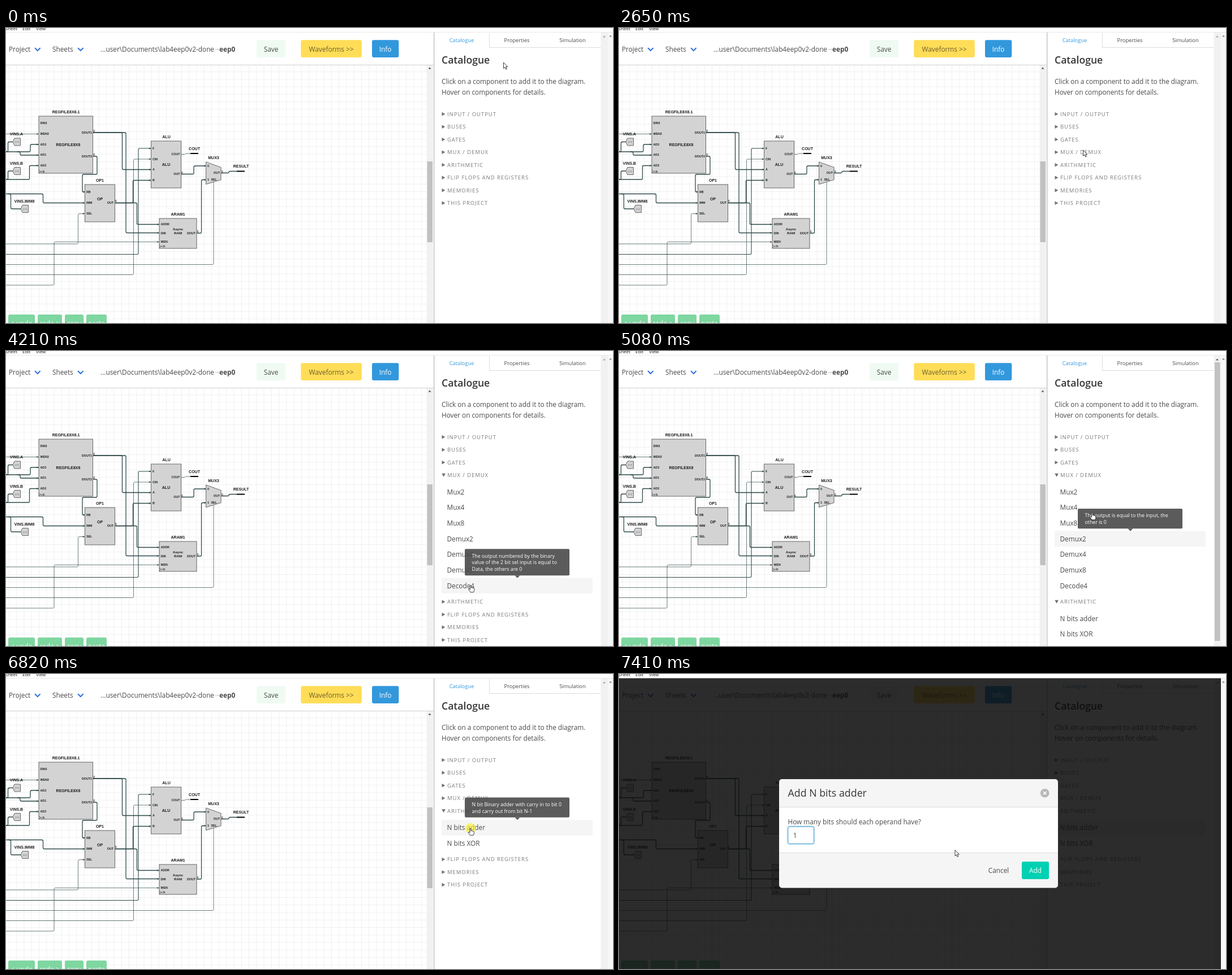
Animation, 1073 px wide and 522 px high, one loop 8 s. Source, as an HTML page:

```html
<!DOCTYPE html>
<html lang="en">
<head>
<meta charset="utf-8">
<title>Component catalogue</title>
<style>
html, body { margin: 0; width: 100%; height: 100%; overflow: hidden; background: #fff; }
svg { display: block; width: 1073px; height: 522px; }
text { font-family: "Open Sans", "Noto Sans", sans-serif; font-size: 11.8px; fill: #4a4a4a; white-space: pre; }
.c { text-anchor: middle; }
.e { text-anchor: end; }
.w { fill: #fff; }
.top { font-size: 8px; fill: #222; }
.tab { font-size: 9.3px; text-anchor: middle; }
.h1 { font-size: 17.6px; font-weight: 600; fill: #363636; }
.title { font-size: 17.8px; fill: #363636; }
.label { font-size: 9.5px; letter-spacing: .95px; fill: #7a7a7a; }
.tip { font-size: 8.8px; fill: #fff; }
.name, .port, .ram, .clk { font-family: "Liberation Sans", Arial, sans-serif; font-weight: bold; fill: #1c1c1c; }
.name { font-size: 7px; text-anchor: middle; }
.port { font-size: 5.3px; }
.ram { font-size: 6.2px; text-anchor: middle; }
.clk { font-size: 5.5px; font-weight: normal; }
.part { fill: #d3d3d3; stroke: #5a5a5a; stroke-width: .9; }
.wire { fill: none; stroke: #2f4a4a; }
.arrow { fill: #2f4a4a; }
.cur { fill: #fff; stroke: #222; stroke-width: .9; stroke-linejoin: round; }
</style>
</head>
<body>
<svg viewBox="0 0 1073 522">
  <defs>
    <pattern id="grid" width="13.25" height="13.25" patternUnits="userSpaceOnUse" x="5" y="77">
      <path d="M0 .5H13.25M.5 0V13.25" stroke="#f0f0f0" fill="none"/>
    </pattern>
  </defs>
  <g id="app"></g>
  <g id="menu"></g>
  <g id="modal"></g>
  <circle id="glow" r="9.3" fill="#fbf032"/>
  <g id="cursor">
    <path id="arrow" class="cur" d="M0 0V10.4L2.4 8.3L4.1 12L5.9 11.2L4.2 7.6H7.3Z"/>
    <path id="hand" class="cur" d="M-1 5.5V.3Q0-1 1 .3V4Q2 3.2 3 4.3Q4 3.6 4.8 4.8Q6.4 4.5 6.3 6V8.6Q6 10.4 5 11.8H-.6Q-1.6 9.8-3.7 7.6Q-4.2 6.2-2.8 6Q-1.6 6.4-1 7.4Z"/>
  </g>
</svg>
<script>
const $ = id => document.getElementById(id);
const esc = s => s.replace(/&/g, '&amp;').replace(/</g, '&lt;').replace(/>/g, '&gt;');
const SIZE = { top: 8, tab: 9.3, h1: 17.6, title: 17.8, label: 9.5, tip: 8.8, name: 7, port: 5.3, ram: 6.2, clk: 5.5 };

// Text placed by the middle of its capitals.
const text = (x, mid, s, cls = '', attr = '') => {
  const size = SIZE[cls.split(' ')[0]] || 11.8;
  return `<text x="${x}" y="${(mid + size * .36).toFixed(2)}" class="${cls}" ${attr}>${esc(s)}</text>`;
};
const box = (x, y, x2, y2, fill, r = 0, attr = '') =>
  `<rect x="${x}" y="${y}" width="${x2 - x}" height="${y2 - y}" rx="${r}" fill="${fill}" ${attr}/>`;
const path = (d, attr) => `<path d="${d}" ${attr}/>`;
const button = (x, y, x2, y2, fill, label, cls = 'c w', attr = '') =>
  box(x, y, x2, y2, fill, 3) + text((x + x2) / 2, (y + y2) / 2 + .7, label, cls, attr);
const upArrow = (x, y, fill) => path(`M${x - 2.5} ${y + 1.5}L${x} ${y - 1.5}L${x + 2.5} ${y + 1.5}Z`, `fill="${fill}"`);

// Right-angled wire: start point, then alternating x and y of each turn.
function wire(width, x, y, ...turns) {
  const pts = [[x, y]];
  turns.forEach((v, i) => {
    const [px, py] = pts[i];
    pts.push(i % 2 ? [px, v] : [v, py]);
  });
  let d = `M${x} ${y}`;
  for (let i = 1; i < pts.length - 1; i++) {
    const p = pts[i];
    const near = q => {
      const len = Math.hypot(q[0] - p[0], q[1] - p[1]), k = Math.min(2.2, len / 2) / len;
      return `${p[0] + (q[0] - p[0]) * k} ${p[1] + (q[1] - p[1]) * k}`;
    };
    d += `L${near(pts[i - 1])}Q${p} ${near(pts[i + 1])}`;
  }
  return path(d + `L${pts[pts.length - 1]}`, `class="wire" stroke-width="${width}"`);
}
// A wire that ends in an input arrow.
const feed = (width, ...p) =>
  wire(width, ...p) + path(`M${p.at(-1)} ${p.at(-2)}l-3.6-1.6v3.2Z`, 'class="arrow"');
const part = (x, y, x2, y2) => box(x, y, x2, y2, '#d3d3d3', 0, 'class="part"');
const ports = (x, list, cls = 'port') => list.map(([y, s]) => text(x, y, s, cls)).join('');
const clock = (x, y) => path(`M${x} ${y - 2.5}l3.5 2.5l-3.5 2.5`, 'fill="none" stroke="#333" stroke-width=".7"') + text(x + 4, y, 'clk', 'clk');
const viewer = (x, y) => path(`M${x} ${y}l3-6.5h10.5v13h-10.5Z`, 'class="part"') +
  text(x + 3.5, y, '(8:0)', 'clk', 'style="font-size:3.8px;fill:#777"');

function circuit() {
  const thick = 1.3, thin = .7;
  return feed(thick, 153.5, 185, 205.5, 250.5, 257) + feed(thick, 153.5, 185, 212, 362.5, 271) +
    feed(thick, 153.5, 227, 161, 259, 135, 290, 139.5) +
    feed(thick, 0, 293.5, 65.5, 309.5, 139.5) + wire(thick, 4, 293.5, 8.5, 320, 26) +
    feed(thin, 0, 382, 127.5, 328.5, 139.5) +
    feed(thick, 192.5, 309.5, 224.5, 269.5, 256.5) + feed(thick, 192.5, 309.5, 231.5, 347.5, 271) +
    feed(thin, 0, 436.5, 225.5, 232, 256.5) + feed(1.1, 0, 400.5, 234, 213, 256.5) +
    feed(thin, 0, 455, 85, 378.5, 271) + wire(thin, 0, 418.5, 367, 272) +
    feed(thick, 309.5, 258.5, 332, 244, 354) + feed(thick, 337, 363, 345.5, 268.5, 354) +
    wire(thin, 309.5, 223.5, 317, 222, 326) + wire(thick, 380, 256.5, 394, 253.5, 408) +
    feed(thin, 0, 187.5, 58) + feed(thick, 0, 219, 43, 206, 58) + feed(thick, 20, 219, 25, 225, 58) +
    wire(thick, 0, 219, 3.5, 201.5, 12) + feed(thick, 0, 268, 41.5, 243.5, 58) + wire(thick, 0, 268, 3.5, 253, 12) +
    path('M326 222h14M408 253.5h14', 'stroke="#000" stroke-width="2.2"') +
    part(58, 156, 153.5, 257) + part(139.5, 277, 192.5, 343) +
    part(256.5, 200, 309.5, 283) + part(271, 337, 337, 390) +
    path('M353.5 237L380 246.5V268.5L353.5 276.5Z', 'class="part"') +
    viewer(12, 201.5) + viewer(12, 253) + viewer(26, 320) +
    ports(60.5, [[168, 'DIN3'], [187.5, 'WEN3'], [206, 'AD3'], [224.5, 'AD1'], [243.5, 'AD2']]) +
    ports(152, [[185, 'DOUT1'], [227, 'DOUT2']], 'port e') +
    ports(142, [[290, 'RB'], [309.5, 'IMM'], [328.5, 'SEL']]) +
    ports(259, [[213, 'F'], [232, 'CIN'], [250.5, 'A'], [269.5, 'B']]) +
    ports(307.5, [[223.5, 'COUT'], [258.5, 'OUT']], 'port e') +
    ports(273.5, [[347.5, 'ADDR'], [363, 'DIN'], [378.5, 'WEN']]) +
    ports(356, [[244, '0'], [268.5, '1']]) + text(362.5, 268.5, 'SEL', 'port') +
    text(190, 309.5, 'OUT', 'port e') + text(335, 363, 'DOUT', 'port e') + text(378, 256.5, 'OUT', 'port e') +
    [[154.3, 182], [154.3, 224.5], [309.8, 256], [192.8, 306.5], [337.5, 360], [380.8, 254]]
      .map(([x, y]) => text(x, y, '8', 'clk')).join('') +
    clock(58, 254) + clock(271, 386.5) +
    [[106, 148.5, 'REGFILE8X8.1'], [110, 206.5, 'REGFILE8X8'], [18.5, 187, 'VINS.A'], [18.5, 239, 'VINS.B'],
      [32.5, 306, 'VINS.IMM8'], [166, 269, 'OP1'], [166, 302.5, 'OP'], [283.5, 192, 'ALU'], [283, 241.5, 'ALU'],
      [333, 213, 'COUT'], [367, 229.5, 'MUX3'], [415.5, 244.5, 'RESULT'], [304, 329.5, 'ARAM1']]
      .map(a => text(...a, 'name')).join('') +
    text(304, 355.5, 'Async', 'ram') + text(304, 363, 'RAM', 'ram');
}

function app() {
  const chevron = x => path(`M${x} 35.2l4.8 4.8l4.8-4.8`, 'fill="none" stroke="#3273dc" stroke-width="2"');
  const green = (x, x2, s) => button(x, 507, x2, 537, '#7ed6a0', s);
  return text(-1, .8, 'Sheet', 'top') + text(29, .8, 'Edit', 'top') + text(53, .8, 'View', 'top') +
    box(0, 7, 1073, 8, '#e8e8e8') +
    text(5, 37.5, 'Project') + chevron(51) + text(82, 37.5, 'Sheets') + chevron(127) +
    text(167, 37.5, '...user\\Documents\\lab4eep0v2-done') +
    path('M369 38h7M374 36.3l2 1.7l-2 1.7', 'fill="none" stroke="#bbb" stroke-width=".8"') +
    text(377, 37.5, 'eep0', '', 'font-weight="700"') +
    button(443, 21.3, 494, 52, '#effaf3', 'Save', 'c') +
    button(521.3, 21.3, 628.8, 52, '#ffdd57', 'Waveforms >>', 'c', 'style="fill:#6b5d2b"') +
    button(647, 21.3, 694.3, 52, '#3298dc', 'Info') +
    box(0, 65, 756, 66, '#d0d0d0') +
    box(0, 66, 743.5, 522, 'url(#grid)') + circuit() +
    green(4, 51, '< undo') + green(56, 99, 'redo >') + green(104, 137, 'copy') + green(142, 178, 'paste') +
    box(743.5, 66, 755, 522, '#f1f1f1') + upArrow(749, 71, '#505050') + box(744.5, 236, 754, 379, '#c1c1c1') +
    box(756, 8, 757.3, 522, '#bdbdbd') +
    path('M854.5 9V34.5H1051.5', 'fill="none" stroke="#dbdbdb"') +
    text(805.5, 22, 'Catalogue', 'tab', 'style="fill:#3298dc"') + text(903, 22, 'Properties', 'tab') + text(1001.5, 22, 'Simulation', 'tab') +
    text(770, 57, 'Catalogue', 'h1') +
    text(770, 95, 'Click on a component to add it to the diagram.') + text(770, 113.7, 'Hover on components for details.') +
    box(1051.5, 8, 1064, 522, '#f1f1f1') + box(1064, 8, 1073, 522, '#f7f7f7') + upArrow(1068.5, 14, '#8a8a8a');
}

const GROUPS = [
  ['INPUT / OUTPUT', 'Input', 'Output', 'Viewer', 'Constant', 'Wire Label'], ['BUSES'], ['GATES'],
  ['MUX / DEMUX', 'Mux2', 'Mux4', 'Mux8', 'Demux2', 'Demux4', 'Demux8', 'Decode4'],
  ['ARITHMETIC', 'N bits adder', 'N bits XOR'], ['FLIP FLOPS AND REGISTERS'], ['MEMORIES'], ['THIS PROJECT']
];
const NUMBERED = ['The output numbered by the binary', 'value of the 2 bit sel input is equal to', 'Data, the others are 0'];
const TIPS = {
  'Mux2': ['Selects one of its two input busses', 'numbered 0 or 1 to be the output.', 'Adjust bus width using', 'Properties'],
  'Demux2': ['The output is equal to the input, the', 'other is 0'],
  'Decode4': NUMBERED,
  'Demux8': NUMBERED.map(s => s.replace('2 bit', '3 bit')),
  'N bits adder': ['N bit Binary adder with carry in to bit 0', 'and carry out from bit N-1']
};

function tooltip(top, lines) {
  const y2 = top - 4.3, y = y2 - 11.9 - lines.length * 11.7;
  return `<g opacity=".9">${box(811, y, 996, y2, '#4a4a4a', 2)}${path(`M899.5 ${y2}h9l-4.5 4.5Z`, 'fill="#4a4a4a"')}</g>` +
    lines.map((s, i) => text(823.5, y + 12.2 + i * 11.7, s, 'tip')).join('');
}

function menu(open, hover, tip) {
  let y = 152.2, out = '', over = '';
  GROUPS.forEach(([label, ...items], g) => {
    const isOpen = open.includes(g);
    out += path(isOpen ? `M770.3 ${y - 3}h6.6l-3.3 6Z` : `M770.5 ${y - 3.2}l5.8 3.2l-5.8 3.2Z`, 'fill="#707070"') +
      text(780, y, label, 'label');
    if (!isOpen) return void (y += 22.5);
    y += 29.7;
    for (const item of items) {
      const on = item === hover;
      if (on) out += box(770, y - 13.8, 1037, y + 13.8, '#f5f5f5', 1);
      if (on && tip) over = tooltip(y - 13.8, TIPS[item]);
      out += text(779.5, y, item);
      y += 27.65;
    }
    y += .75;
  });
  const full = open.length > 1;
  return out + upArrow(1057.5, 15, full ? '#505050' : '#a3a3a3') +
    (full ? box(1053, 20, 1062.5, 513, '#c1c1c1') : '') + over;
}

function modal() {
  return box(0, 7.5, 1064, 522, '#0a0a0a', 0, 'opacity=".86"') +
    box(283, 186, 776, 378.5, '#f5f5f5', 5) + box(283, 235, 776, 317, '#dbdbdb') + box(283, 236, 776, 316, '#fff') +
    text(298.5, 211, 'Add N bits adder', 'title') +
    '<circle cx="752.7" cy="210.7" r="7.8" fill="#b8b8b8"/>' +
    path('M750 208l5.4 5.4m0-5.4l-5.4 5.4', 'stroke="#fff" stroke-width="1.6"') +
    text(298.5, 261.3, 'How many bits should each operand have?') +
    box(297.5, 269, 345.5, 301.5, 'none', 4, 'stroke="#3298dc" stroke-opacity=".25" stroke-width="2"') +
    box(298.8, 270.2, 344.4, 300.3, '#fff', 3, 'stroke="#3f9fce"') +
    text(307.8, 286, '1') + box(314.5, 279, 315.3, 293, '#333', 0, 'id="caret"') +
    text(671, 348, 'Cancel', 'c') + button(712, 332, 760, 363, '#00d1b2', 'Add');
}

const MOVES = [
  [0, 879.5, 61], [240, 879.5, 61], [990, 835.5, 147], [2030, 835.5, 147], [2520, 820.5, 216], [2900, 820.5, 216],
  [3210, 820.5, 249], [3540, 820.5, 249], [3680, 821, 361], [4140, 821, 361], [4205, 821.5, 415], [4420, 821.5, 415],
  [4820, 832, 440], [4960, 832, 440], [5075, 836.5, 287], [5180, 836.5, 287], [5500, 821, 216], [5950, 821, 216],
  [6540, 821, 273.5], [7220, 821, 273.5], [7410, 594, 311.5], [8000, 594, 311.5]
];
// Start time, open groups, hovered item, tooltip shown.
const STATES = [
  [0, []], [1190, [0]], [1900, []], [2790, [3]], [3000, [3], 'Mux2'], [3070, [3], 'Mux2', 1], [3570, [3], 'Demux4'],
  [4140, [3], 'Demux8', 1], [4190, [3], 'Decode4', 1], [4620, [3]], [4950, [3, 4]], [5030, [3, 4], 'Demux2', 1],
  [5230, [3, 4], 'Mux2'], [5380, [3, 4]], [5800, [4]], [6270, [4], 'N bits adder'], [6340, [4], 'N bits adder', 1],
  [6890, [4], 'N bits adder']
];
const CLICKS = [[1060, 1390], [1780, 2030], [2700, 2900], [4830, 4985], [5600, 5850], [6740, 6890]];

function cursorAt(t) {
  const i = MOVES.findIndex(m => m[0] > t);
  const [t0, x0, y0] = MOVES[i - 1], [t1, x1, y1] = MOVES[i];
  const p = (t - t0) / (t1 - t0), k = p * p * (3 - 2 * p);
  return [x0 + (x1 - x0) * k, y0 + (y1 - y0) * k];
}

$('app').innerHTML = app();
$('modal').innerHTML = modal();
let shown;
function draw() {
  const t = performance.now() % 8000;
  const state = STATES.filter(s => s[0] <= t).pop();
  if (state !== shown) {
    shown = state;
    $('menu').innerHTML = menu(...state.slice(1));
  }
  const dialog = t >= 6890;
  $('modal').style.display = dialog ? '' : 'none';
  $('caret').style.display = t < 7290 ? '' : 'none';

  const [x, y] = cursorAt(t);
  $('cursor').setAttribute('transform', `translate(${x.toFixed(1)} ${y.toFixed(1)})`);
  const hand = state[2] && !dialog;
  $('hand').style.display = hand ? '' : 'none';
  $('arrow').style.display = hand ? 'none' : '';

  const click = CLICKS.find(c => t >= c[0] && t < c[1]);
  const fade = click ? Math.min(1, (t - click[0]) / 70, (click[1] - t) / 70) : 0;
  $('glow').setAttribute('opacity', (.65 * fade).toFixed(2));
  $('glow').setAttribute('cx', x);
  $('glow').setAttribute('cy', hand ? y - .5 : y + 3);
  requestAnimationFrame(draw);
}
draw();
</script>
</body>
</html>
```
